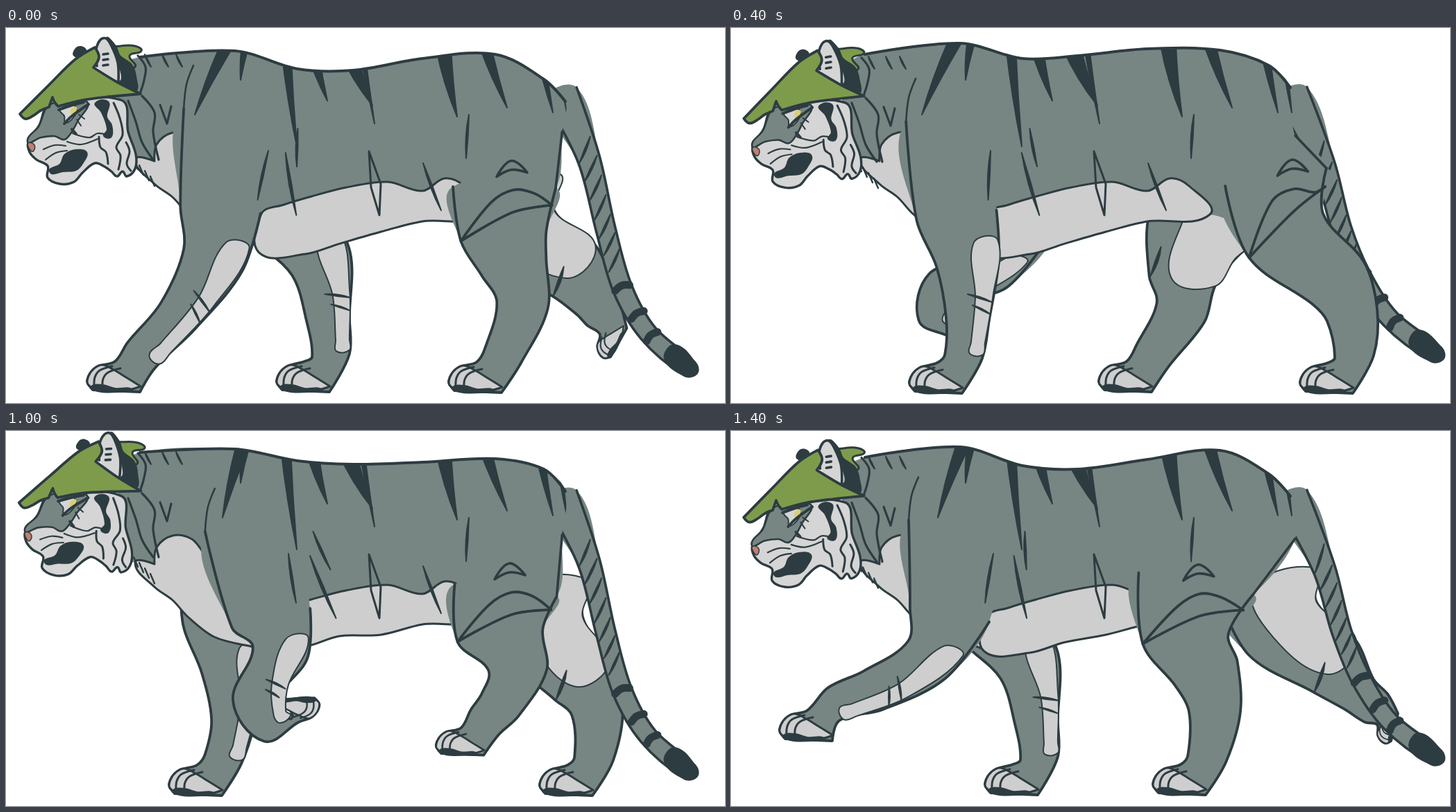
These frames come from a looping animation (1036 px wide and 541 px high, 1600 ms). An HTML page with a canvas:

```html
<!DOCTYPE html>
<html lang="en">
<head>
<meta charset="utf-8">
<title>Walking tiger</title>
<style>
html, body { margin: 0; width: 100%; height: 100%; overflow: hidden; background: #fff; }
canvas { display: block; }
</style>
</head>
<body>
<canvas id="stage" width="1036" height="541"></canvas>
<script>
const ctx = document.getElementById('stage').getContext('2d');
const INK = '#2d3c41', FUR = '#788683', PALE = '#cecece', FACE = '#d5d5d5', STEP = 200;

// "x,y" pairs; a trailing "!" marks a corner.
const points = text => text.split(' ').map(s => [...s.replace('!', '').split(',').map(Number), s.endsWith('!')]);
const lerp = (a, b, t) => a + (b - a) * t;

function curve(p, closed) {
  if (typeof p === 'string') p = points(p);
  const n = p.length, path = new Path2D();
  const tangent = i => {
    if (p[i][2] || (!closed && (i === 0 || i === n - 1))) return [0, 0];
    const a = p[(i + n - 1) % n], b = p[(i + 1) % n], l = Math.hypot(b[0] - a[0], b[1] - a[1]) || 1;
    return [(b[0] - a[0]) / l, (b[1] - a[1]) / l];
  };
  path.moveTo(p[0][0], p[0][1]);
  for (let i = 0; i < (closed ? n : n - 1); i++) {
    const j = (i + 1) % n, a = p[i], b = p[j], s = tangent(i), e = tangent(j);
    const l = Math.hypot(b[0] - a[0], b[1] - a[1]) / 3;
    path.bezierCurveTo(a[0] + s[0] * l, a[1] + s[1] * l, b[0] - e[0] * l, b[1] - e[1] * l, b[0], b[1]);
  }
  return path;
}
function fill(p, color) {
  const path = curve(p, true);
  ctx.fillStyle = color;
  ctx.fill(path);
  return path;
}
function line(p, width = 3.6, closed) {
  ctx.lineWidth = width;
  ctx.strokeStyle = INK;
  ctx.stroke(curve(p, closed));
}
function shape(p, color, width = 2.4) {
  fill(p, color);
  line(p, width, true);
}
const lines = (width, ...all) => all.forEach(p => line(p, width));

// Tapered stripe, pointed at the far end or at both ends.
function stripe(x1, y1, x2, y2, w, blunt) {
  const l = Math.hypot(x2 - x1, y2 - y1), nx = (y1 - y2) / l * w / 2, ny = (x2 - x1) / l * w / 2;
  const mx = (x1 + x2) / 2, my = (y1 + y2) / 2, b = blunt ? 1 : 0;
  ctx.fillStyle = ctx.strokeStyle = INK;
  ctx.lineWidth = 2;
  ctx.beginPath();
  ctx.moveTo(x1 + nx * b, y1 + ny * b);
  ctx.quadraticCurveTo(mx + nx, my + ny, x2, y2);
  ctx.quadraticCurveTo(mx - nx * .3, my - ny * .3, x1 - nx * b, y1 - ny * b);
  ctx.fill();
  ctx.stroke();
}

// A chain of joints, each with a half-width, seen as a tube.
function chain(text, widths, dx = 0, dy = 0) {
  const j = text.split(' ').map((s, i) => {
    const [x, y, w = widths[i]] = s.split(',').map(Number);
    return { x: x + dx, y: y + dy, w };
  });
  j.forEach((o, i) => {
    const a = j[Math.max(i - 1, 0)], b = j[Math.min(i + 1, j.length - 1)], l = Math.hypot(b.x - a.x, b.y - a.y);
    o.nx = (b.y - a.y) / l;
    o.ny = (a.x - b.x) / l;
  });
  return j;
}
// Point at joint t, from -1 on the front edge to 1 on the back edge.
function at(c, t, k) {
  const i = Math.min(Math.floor(t), c.length - 2), a = c[i], b = c[i + 1], f = t - i;
  return [lerp(a.x + a.nx * a.w * k, b.x + b.nx * b.w * k, f), lerp(a.y + a.ny * a.w * k, b.y + b.ny * b.w * k, f)];
}
function edge(c, k, from = 0, to = c.length - 1) {
  const out = [];
  for (let t = from; t < to; t++) out.push(at(c, t, k));
  return [...out, at(c, to, k)];
}
const strip = (c, k, from, to) => shape([...edge(c, k, from, to), ...edge(c, 1, from, to).reverse()], PALE, 2);
const bar = (c, t, k1, k2, w) => stripe(...at(c, t, k1), ...at(c, t - .15, k2), w);

// Paws hang from the ankle at (78,-50).
const toes = points('40,-41 14,-33 0,-14 8,0! 76,3!');
function paw(ankle, [turn, size]) {
  ctx.save();
  ctx.translate(ankle.x, ankle.y);
  ctx.rotate(turn);
  ctx.scale(size, size);
  ctx.translate(-78, 50);
  shape('1,-8 2,-20 10,-31 22,-36 38,-29 56,-18 77,-5! 55,1 18,1', PALE, 3);
  lines(3, '10,-4 11,-18 18,-28 36,-34', '22,-4 23,-16 30,-25 48,-31');
  fill('5,-5 22,-8 40,-3 66,0 45,4 15,3', INK);
  ctx.restore();
}
function leg(c, foot, open) {
  const ankle = c[c.length - 1], cos = Math.cos(foot[0]) * foot[1], sin = Math.sin(foot[0]) * foot[1];
  const sole = toes.map(([x, y, corner]) =>
    [ankle.x + (x - 78) * cos - (y + 50) * sin, ankle.y + (x - 78) * sin + (y + 50) * cos, corner]);
  const front = [...edge(c, -1), ...sole], back = edge(c, 1).reverse();
  fill([...front, ...back], FUR);
  line([...front, ...(open ? back.slice(0, -open) : back)], 3.8);
  paw(ankle, foot);
}
const ARM = [62, 58, 45, 31, 27], THIGH = [74, 62, 48, 37, 28], TAIL = [24, 16, 14, 14, 13, 12];

function foreleg(p, dx, dy) {
  const c = chain(p.arm, ARM, dx, dy);
  leg(c, p.hand, 1);
  strip(c, .3, 1.6, 3.9);
  bar(c, 2.7, 1, 0, 7);
  bar(c, 2.9, 1, .2, 6);
  return c;
}
function farHind(p, dx) {
  const c = chain(p.thigh, THIGH, dx);
  leg(c, p.foot);
  strip(c, -.3, 0, 2);
  const [x, y] = at(c, 2, -1);
  stripe(x + 2, y, x + 17, y - 42, 12);
}
function nearHind(p) {
  const c = chain(p.thigh, THIGH);
  leg(c, p.foot);
  const a = at(c, 1, -1), b = at(c, .4, 1), x = (a[0] + b[0]) / 2 + 10, y = (a[1] + b[1]) / 2 - 48;
  lines(3.8, [a, [x - 32, y + 18], [x, y], [x + 30, y + 5], b], [a, [x, y + 32], b]);
  line(`${x - 24},${y - 19}! ${x - 3},${y - 42} ${x + 20},${y - 25}! ${x - 3},${y - 29}`, 3.6, true);
  return c;
}
function tail(c) {
  const [x, y] = at(c, 5, 0), outline = [...edge(c, -1), [x + 10, y + 6], ...edge(c, 1).reverse()];
  fill(outline, FUR);
  line(outline, 3.6);
  shape([...edge(c, -1, 4.55, 5), [x + 10, y + 6], ...edge(c, 1, 4.5, 5).reverse()], INK);
  for (let t = 1; t < 2.7; t += .28) stripe(...at(c, t, -.9), ...at(c, t - .3, .8), 8);
  for (const t of [3, 3.6, 4.1]) line([at(c, t, -.8), at(c, t - .04, 0), at(c, t, .8)], 11);
}

const LOW = '800,95 840,190 864,290 888,375 925,440 985,492';
const LONG = '808,95 855,200 880,290 908,358 950,420 1016,471';
const BACK_X = [193, 330, 420, 500, 600, 705, 775];
const FLAT = [0, 1];

// head: turn, x, y. back: heights at BACK_X. far: which foreleg pose the far side takes, and its shift.
const poses = [
  { head: [0, 0, 0], back: [42, 33, 59, 61, 44, 38, 74], tail: LOW, cut: 272, far: [3, 24, 0],
    arm: '318,120 309,262 298,335 248,415 195,472', hand: FLAT,
    thigh: '718,230 717,300 732,345 744,400 716,473', foot: FLAT },
  { head: [-.01, -1, 1.5], back: [40, 27, 53, 54, 39, 35, 66], tail: LOW, cut: 273, far: [5, 0, 0],
    arm: '315,125 312,270 327,345 327,420 313,473', hand: FLAT,
    thigh: '765,225 775,295 830,360 852,405 847,473', foot: FLAT },
  { head: [-.02, -2, 3], back: [38, 22, 44, 40, 30, 32, 54], tail: LONG, cut: 275, far: [6, 45, 32],
    arm: '314,130 325,270 341,340 341,420 335,474', hand: FLAT,
    thigh: '785,215 800,300 875,368 895,415 898,474', foot: FLAT },
  { head: [.01, -1, -3], back: [36, 25, 46, 45, 38, 36, 54], tail: LONG, cut: 300, far: [7, 0, 0],
    arm: '340,130 380,270 430,340 440,420 444,472', hand: FLAT,
    thigh: '775,220 795,285 870,340 905,380,30 930,400,26', foot: [-1.37, .6] },
  { head: [.028, 0, -6], back: [34, 26, 45, 47, 45, 41, 54], tail: LONG, cut: 320, far: [0, 0, 0],
    arm: '364,130 410,268 462,335 470,410 468,474', hand: FLAT,
    thigh: '775,225 790,300 868,350 900,395,33 912,415,28', foot: [-1.1, .7] },
  { head: [.07, 0, -8], back: [31, 26, 43, 48, 45, 40, 55], tail: LOW, cut: 312, far: [1, 0, 0],
    arm: '347,130 382,270 395,320,40 358,390 392,430', hand: [3.05, .8],
    thigh: '720,230 712,295 737,345,42 712,395,31 690,420,27', foot: [0, .9] },
  { head: [.035, 0, -7.5], back: [31, 22, 43, 46, 46, 39, 55], tail: LONG, cut: 298, far: [3, -22, 0],
    arm: '332,130 365,255 335,318,30 262,345 252,395', hand: [-2.1, .65],
    thigh: '735,200,95 665,300,70 650,365 648,410 608,472', foot: FLAT },
  { head: [-.012, -2, -1.5], back: [38, 23, 50, 55, 41, 28, 62], tail: LONG, cut: 298, far: [3, 0, 0],
    arm: '318,130 315,265 282,330,38 205,374 148,394,25', hand: FLAT,
    thigh: '670,220,84 655,300 685,350 697,405 686,472', foot: FLAT }
];
// Stripes hanging from the back: top x, tip x, tip y, width.
const hanging = [[345, 338, 75, 10], [403, 419, 171, 14], [440, 463, 105, 18], [490, 528, 112, 26],
  [512, 531, 138, 7], [630, 650, 128, 22], [690, 722, 115, 16], [768, 788, 122, 13], [795, 808, 122, 8]];

function drawNeck() {
  lines(3.2, '190,40 201,56 199,75 194,92', '196,98 214,122 212,150 220,190', '222,111 232,138! 238,113',
    '176,105 187,135 196,165 212,190');
  for (const x of [200, 225, 245]) stripe(x, 38, x + 9, 56, 5);
  for (let x = 184; x < 216; x += 8) line([[x, x + 6], [x + 6, x + 20]], 2.4);
}
function drawHead() {
  fill('97,40 100,29 108,26 116,32 110,42', INK);
  shape('145,32 165,26 186,26 195,33 178,40 186,56 160,60', '#7e9b4c', 3);
  shape('62,112 48,140 32,165 34,179 44,190 60,199 60,216 78,225 98,222 110,209 128,195 142,200 152,207 160,214 168,207 174,214 186,203 187,182 176,150 166,104', FACE, 3.4);
  shape('64,110 47,142 31,164 50,158 70,156 84,161 94,151 103,135 116,106', FUR, 2.6);
  shape('32,166 34,175 39,178 41,169', '#c08070', 1.5);
  fill('62,204 77,196 84,182 100,175 117,179 111,196 101,206 82,208 66,211', INK);
  lines(2.2, '54,175 70,169 86,170', '57,190 72,180 88,177', '96,152 120,158 132,152 145,154', '88,164 108,168 132,160');
  shape('78,118 95,111 102,116 98,128 86,137 84,127', FACE, 2);
  fill('94,117 102,114 99,123 94,125', '#d9cf72');
  lines(4, '76,118 96,111 112,107', '84,138 95,127 119,110', '95,146 101,153');
  lines(2, '105,125 113,131', '102,132 108,141');
  fill('128,108 148,106 146,128 153,140 152,158 140,156 145,146 137,122', INK);
  lines(3, '134,157 136,172 144,179 147,196', '155,108 164,130 168,154 159,172 165,184 162,204', '173,165 178,178 174,196 180,206');

  shape('145,15 158,26 164,40 181,53 187,70 186,91 164,77 158,50', INK, 2);
  const ear = '131,55 130,31 136,17 144,15 152,26 161,50 162,77';
  fill(ear, FACE);
  line(ear);
  for (let y = 38; y < 56; y += 8) line([[140, y], [147, y - 1]]);
  shape('20,124! 62,82 100,45 128,28! 134,42 126,57! 160,78 194,95! 150,99 110,104 75,113! 70,107 67,100! 62,114! 50,119 40,126 28,131', '#7e9b4c', 3.8);
}

function draw(i) {
  const p = poses[i], across = poses[(i + 4) % 8];
  ctx.fillStyle = '#fff';
  ctx.fillRect(0, 0, 1036, 541);
  ctx.lineCap = ctx.lineJoin = 'round';

  const [twin, dx, dy] = p.far;
  foreleg(poses[twin], dx, dy);
  farHind(across, i === 0 ? -50 : 0);
  const tube = chain(p.tail, TAIL), hip = chain(p.thigh, THIGH);
  tail(tube);

  const back = BACK_X.map((x, n) => [x, p.back[n]]);
  back.push([806, p.back[6] + 32]);
  const rump = [at(tube, .5, -1), at(hip, 0, 1)];
  const sag = 315 + 9 * Math.cos((i - 1) * Math.PI / 4);
  const under = points(`690,269 600,279 540,294 480,${sag - 10} 430,${sag + 5} 365,${sag + 3}`);
  const brisket = points('385,314 350,310 300,297 262,268 240,244 214,225 186,190');
  const body = fill([...back, ...rump, [hip[1].x, hip[1].y], ...under, ...brisket, [165, 190], [165, 60]], FUR);
  shape([...brisket, ...points('214,192! 217,168 240,151 268,156 290,185 320,230 365,275')], PALE, 3);
  shape([...points('368,268 400,255 440,243 490,230 550,222 600,235 632,217 660,228'), ...under], PALE, 3);

  const hind = nearHind(p), arm = foreleg(p);
  line([at(hind, 0, 1), rump[0]]);
  const [sx, sy] = at(arm, 0, -1);
  line([[sx, sy], [sx + 4, sy - 35], [sx + 14, sy - 62]], 2.6);

  ctx.save();
  ctx.clip(body);
  stripe((p.cut + 352) / 2 + 10, 18, p.cut, 125, 18, true);
  hanging.forEach(([x1, x2, y, w]) => stripe(x1, 24, x2, y, w, true));
  ctx.restore();
  line(back, 4);

  // Flank stripes lean with the upper arm.
  const lean = arm[1].x - arm[0].x, x = arm[0].x + 60;
  stripe(x, 177, x + lean * .6 - 10, 248, 9);
  stripe(425 + lean * .5, 145, 429 + lean * 1.1, 200, 9);
  stripe(410 + lean * .8, 180, 430 + lean * 1.3, 270, 11);
  stripe(667, 125, 663, 188, 9);
  if (hind[0].x > 700) stripe(601, 195, 627, 263, 9);
  line('523,178! 540,225! 538,270! 526,230!', 3, true);

  const [turn, hx, hy] = p.head;
  ctx.translate(hx, hy);
  drawNeck();
  ctx.translate(200, 100);
  ctx.rotate(turn);
  ctx.translate(-200, -100);
  drawHead();
  ctx.resetTransform();
}

const start = performance.now();
let shown = -1;
function tick() {
  const i = Math.floor((performance.now() - start) / STEP) % poses.length;
  if (i !== shown) draw(shown = i);
  requestAnimationFrame(tick);
}
tick();
</script>
</body>
</html>
```
